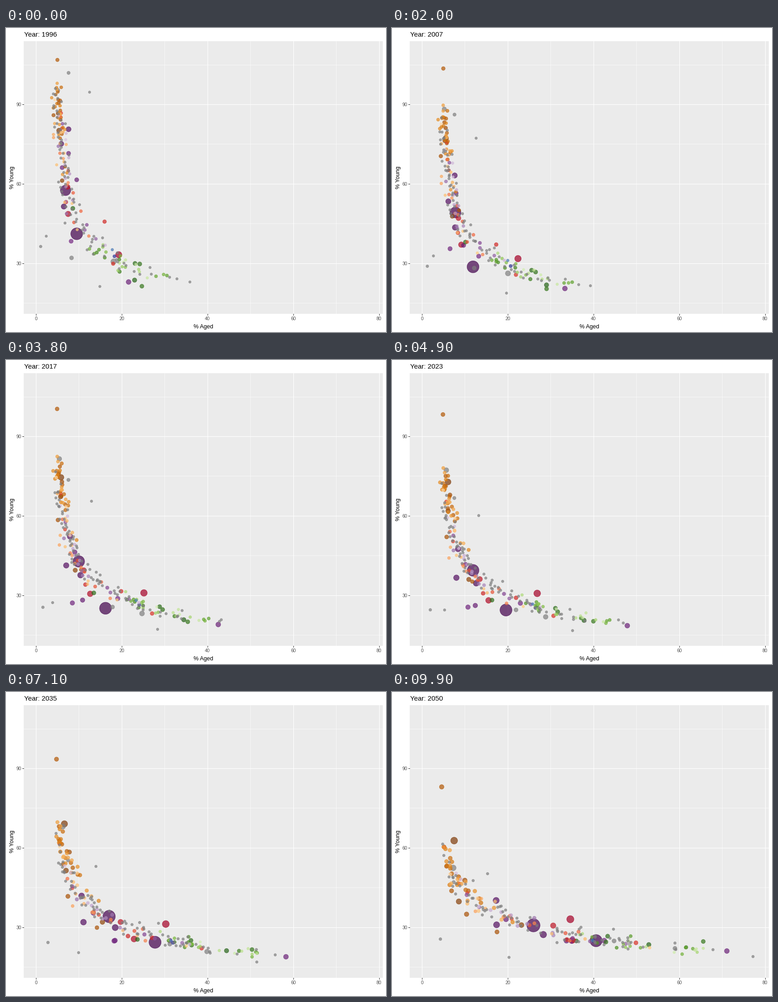
A matplotlib script for the animation above (10000 ms loop, 837x669 px).

```python
import numpy as np
import matplotlib.pyplot as plt
from matplotlib.animation import FuncAnimation
from matplotlib.colors import LinearSegmentedColormap

W, H = 837, 669
FRAMES, INTERVAL = 100, 100
FIRST, LAST = 1996, 2050
LEFT, TOP, RIGHT, BOTTOM = 39.5, 28.5, 830.5, 629
plt.rcParams["font.family"] = "Liberation Sans"

PALETTES = {
    "africa": ["#7F3B08", "#B35806", "#E08214", "#FDB863", "#FEE0B6"],
    "asia": ["#40004B", "#762A83", "#9970AB", "#C2A5CF", "#E7D4E8"],
    "americas": ["#A50026", "#D73027", "#F46D43", "#FDAE61", "#FEE090"],
    "europe": ["#276419", "#4D9221", "#7FBC41", "#B8E186", "#E6F5D0"],
    "oceania": ["#313695", "#4575B4", "#74ADD1"],
    "other": ["#7F7F7F", "#7F7F7F"],
}
GROWTH = dict(africa=1.27, asia=1.2, americas=1.13, europe=1, oceania=1.08, other=1.05)
DROP = dict(africa=1.1, asia=2, americas=2.4, europe=1.2, oceania=1.5, other=1.7)

rng = np.random.default_rng(12)
p = np.linspace(0, 1, FRAMES)
bubbles = []


def px(aged):
    return 66 + 9.445 * aged


def py(young):
    return 692.3 - 5.825 * young


def move(region, shade, radius, start, end, late=None, drop=None, growth=None):
    """Ageing speeds up by `late`; youth falls early by `drop`."""
    (a0, y0), (a1, y1) = start, end
    late = late or 1.2 + .7 * np.clip((y0 - 25) / 30, 0, 1)
    dip = 3 * np.clip((45 - y0) / 15, 0, 1) * np.sin(np.pi * p)
    aged = a0 + (a1 - a0) * p ** late
    young = y1 + (y0 - y1) * (1 - p) ** (drop or DROP[region]) - dip
    r = radius * (1 + ((growth or GROWTH[region]) - 1) * p)
    ramp = LinearSegmentedColormap.from_list(region, PALETTES[region])
    bubbles.append((px(aged), py(young), r, (*ramp(shade)[:3], .7)))


def crowd(region, n, low, high, skew=1, pale=(.25, .9)):
    """Small bubbles that start and end near the two demographic curves."""
    young = low + (high - low) * ((np.arange(n) + rng.random(n)) / n) ** skew
    shades = rng.permutation(np.linspace(*pale, n))
    for y0, shade in zip(young, shades):
        a0 = (4 + 16 * (30 / y0) ** 2.36) * rng.normal(1, .13)
        a1 = 6 + 49 * (max(95 - y0, 0) / 70) ** 1.5
        a1 = max(a1 * rng.normal(1, .15), 4.8)
        y1 = 105.6 * a1 ** -.383 * rng.normal(1, .07)
        radius = 3.1 if region == "other" else 4.3 - 1.2 * shade
        move(region, shade, radius, (a0, y0), (a1, y1))


# the large, easily followed bubbles: (% aged, % young) at both ends
move("asia", 0, 13.5, (9.5, 41.1), (40.6, 24.9), 1.6, 6, 1.03)
move("asia", .02, 11.9, (6.9, 57.5), (26, 30.7), 1.9, 1.65, 1.26)
move("asia", .06, 6.3, (6.5, 51.4), (28.3, 27.2), 1.8, 1.75)
move("asia", .1, 6, (7.6, 80.6), (17.3, 40.1), 3.5, 2.5)
move("asia", .1, 6, (5.9, 75.1), (17.4, 30.9), 2.4, 3)
move("asia", .2, 5, (7.6, 71.5), (19.6, 33), 2.2, 2.2)
move("asia", .18, 5, (9.5, 61.5), (33.7, 24.9), 3, 5)
move("asia", .23, 5, (6.1, 66.1), (34.9, 24.8), 2.6, 6)
move("asia", .25, 5, (8.2, 38.3), (42.5, 24.9), 1.2)
move("asia", .2, 5.8, (21.6, 22.9), (71.1, 21), .9, growth=1)

move("africa", 0, 5.9, (5.4, 80.1), (7.5, 62.7), 1.6, .8, 1.36)
move("africa", .04, 5, (5.2, 86.6), (8.6, 39.7))
move("africa", .08, 4.7, (6.1, 61.2), (23.2, 30.8), 1.8, 2.6)
move("africa", .2, 4.3, (4.1, 85.9), (10.4, 34.9), drop=1.6)
move("africa", .15, 4.3, (5.3, 90.5), (10, 47.7))
move("africa", .25, 4.3, (5, 106.8), (4.6, 83), drop=.65)
move("africa", .2, 4, (6.8, 66.5), (17.5, 28.2), 1.1, 2.5)

move("americas", 0, 7.4, (19.3, 33.2), (34.6, 33), 1)
move("americas", .06, 6.4, (7.5, 48.6), (35, 25), drop=3)
move("americas", .12, 5.7, (7.4, 58.8), (30.6, 30.6))
move("americas", .2, 4.5, (7, 53.1), (33.8, 25.3))
move("americas", .22, 4.5, (16, 45.7), (35.4, 25))
move("americas", .26, 4.4, (18, 29.8), (49.9, 24.1))

move("europe", .05, 5, (8.6, 50.7), (36, 24.8), drop=3)
move("europe", 0, 5.3, (23, 23.6), (52.9, 23.4), 1)
move("europe", .1, 4.9, (24.7, 21.3), (65.6, 24.6), 1.4)
move("europe", .05, 5, (23.1, 29.9), (43.3, 26.6))
move("europe", .08, 5, (24.2, 29.7), (42.9, 24.4))
move("europe", .15, 4.4, (19.5, 26.8), (61.6, 22.4))

move("oceania", 0, 3.9, (18.3, 32.6), (39.9, 24.9))
move("oceania", .55, 3.3, (17.8, 35.1), (39.8, 25))

move("other", 0, 6.5, (18.1, 30.6), (59, 22), 1.9, growth=.75)
move("other", 0, 4.8, (5.1, 95.3), (7.3, 52.4), drop=.8, growth=1.4)
move("other", 0, 4.8, (8.3, 32), (44.8, 24.8), 1.4)
move("other", 0, 4, (7.6, 101.9), (7.4, 47), drop=1.5)
move("other", 0, 3.1, (12.5, 94.6), (15.3, 50.2), drop=2.2)
move("other", 0, 3.1, (35.9, 22.9), (59, 24))
move("other", 0, 3.1, (14.9, 21.2), (77.2, 18.9), 1.6)
move("other", 0, 3.4, (1.1, 36.3), (4.3, 25.5), 1.9, 4)
move("other", 0, 3.1, (2.4, 40.2), (20.3, 18.6), 2.6)

crowd("africa", 26, 77, 98, pale=(.22, .7))
crowd("africa", 9, 60, 94, pale=(.45, .95))
crowd("asia", 17, 35, 88, pale=(.35, .92))
crowd("americas", 19, 40, 88, pale=(.3, .9))
crowd("europe", 23, 24, 37, pale=(.18, .9))
crowd("other", 74, 24, 96, skew=1.15)

bubbles.sort(key=lambda b: -b[2][0])
X, Y, R, colors = zip(*bubbles)
X, Y, R = map(np.array, (X, Y, R))

fig = plt.figure(figsize=(W / 72, H / 72), dpi=72, facecolor="white")
ax = fig.add_axes([0, 0, 1, 1])
ax.set(xlim=(0, W), ylim=(H, 0))
ax.axis("off")
ax.add_patch(plt.Rectangle((LEFT, TOP), RIGHT - LEFT, BOTTOM - TOP, fc="#EBEBEB", lw=0))

# grid: the labelled lines are twice as heavy
for v in range(0, 81, 10):
    ax.plot([px(v)] * 2, [TOP, BOTTOM], color="white", lw=.6 if v % 20 else 1.15, zorder=1)
for v in range(15, 106, 15):
    ax.plot([LEFT, RIGHT], [py(v)] * 2, color="white", lw=.6 if v % 30 else 1.15, zorder=1)

label = dict(size=10.1, color="#4D4D4D")
for v in range(0, 81, 20):
    ax.plot([px(v)] * 2, [BOTTOM, BOTTOM + 3], color="#333333", lw=1)
    ax.text(px(v), 643.3, str(v), ha="center", **label)
for v in (30, 60, 90):
    ax.plot([LEFT - 3, LEFT], [py(v)] * 2, color="#333333", lw=1)
    ax.text(33.5, py(v) + 4, str(v), ha="right", **label)
ax.text(435, 660.5, "% Aged", size=12.6, ha="center")
ax.text(14, 329, "% Young", size=12.6, ha="center", va="center", rotation=90)
title = ax.text(40, 19, "", size=15)

dots = ax.scatter(X[:, 0], Y[:, 0], c=colors, edgecolors=colors, linewidths=.8, zorder=3)


def draw(i):
    dots.set_offsets(np.column_stack([X[:, i], Y[:, i]]))
    dots.set_sizes((2 * R[:, i] - .8) ** 2)
    title.set_text(f"Year: {round(FIRST + (LAST - FIRST) * p[i])}")
    return dots, title


anim = FuncAnimation(fig, draw, frames=FRAMES, interval=INTERVAL, repeat=True, repeat_delay=0)
plt.show()
```
